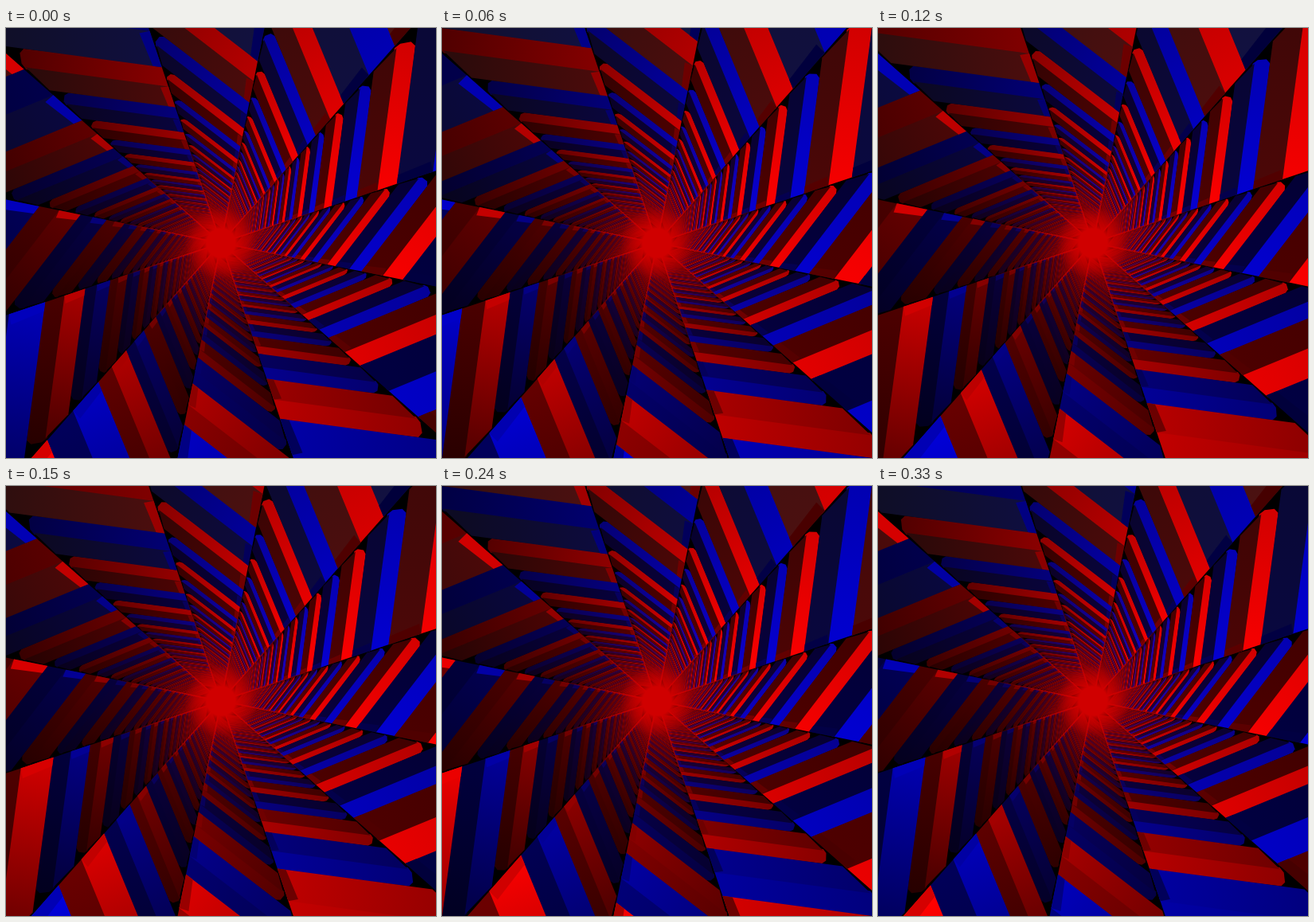
These frames come from a looping animation (540x540 px, 0.36 s). An HTML page with a canvas:

```html
<!DOCTYPE html>
<html>
<head>
<meta charset="utf-8">
<style>
  html, body { margin: 0; width: 100%; height: 100%; overflow: hidden; background: #000; }
  canvas { display: block; width: 540px; height: 540px; }
</style>
</head>
<body>
<canvas id="stage" width="540" height="540"></canvas>
<script>
const ctx = document.getElementById('stage').getContext('2d');
const STEP = 30, LOOP = 360, CENTER = 270;
const WALLS = 12, BARS = 44, TURN = 360 / WALLS, TILT = 11.55;
// Each wall is tilted: one edge lies closer to the axis than the other.
const NEAR_EDGE = 792, FAR_EDGE = 1268;
const FOG = [208, 0, 0];

const clamp = v => Math.max(0, Math.min(1, v));
const mix = (a, b, k) => a + (b - a) * k;

// How directly a wall faces a light that shines best on wall number `best`.
const facing = (wall, best) => Math.cos((wall - best) * TURN * Math.PI / 180);

// Brightness of each face, near the viewer and deep inside the tunnel.
const light = {
  front: {
    near: wall => 160 + 90 * facing(wall, 1.8),
    deep: wall => 155 + 100 * facing(wall, 0.9)
  },
  inner: {
    near: wall => 75 + 180 * clamp((facing(wall, 5.6) - 0.2) * 1.7),
    deep: () => 72
  },
  cap: {
    near: wall => Math.max(70, 135 + 110 * facing(wall, 7.5)),
    deep: () => 110
  }
};

function polar(angle, radius) {
  const a = angle * Math.PI / 180;
  return [CENTER + radius * Math.sin(a), CENTER - radius * Math.cos(a)];
}

// Point on a wall at depth z; u runs from the inner edge (0) to the outer edge (1).
function wallPoint(wall, z, u) {
  const start = TILT + wall * TURN;
  const p = polar(start + TURN - 0.15, NEAR_EDGE / z);
  const q = polar(start + 0.15, FAR_EDGE / z);
  return [mix(p[0], q[0], u), mix(p[1], q[1], u)];
}

function shade(face, wall, z, red, dim) {
  const nearness = clamp((6 - z) / 3.4);
  const level = mix(light[face].deep(wall), light[face].near(wall), nearness) * dim;
  const gray = face === 'inner' ? 20 * nearness * clamp(facing(wall, 11)) : 0;
  const rgb = red ? [level, gray, gray] : [gray, gray, level * 0.85];
  const fog = 1 - Math.exp(-Math.pow(z / 22, 2.6));
  return 'rgb(' + rgb.map((c, i) => Math.round(mix(c, FOG[i], fog))).join(',') + ')';
}

function fillFace(face, wall, z, red, corners) {
  const paint = ctx.createLinearGradient(...wallPoint(wall, z, 0), ...wallPoint(wall, z, 1));
  const fade = face === 'cap' ? 1 : 0.67 + 0.2 * facing(wall, 2);
  paint.addColorStop(0, shade(face, wall, z, red, 1));
  paint.addColorStop(1, shade(face, wall, z, red, fade));
  ctx.fillStyle = paint;
  ctx.beginPath();
  corners.forEach(([depth, u]) => ctx.lineTo(...wallPoint(wall, depth, u)));
  ctx.fill();
}

function drawBar(wall, z, red) {
  const edge = z + 0.42, end = z + 1;
  fillFace('front', wall, z + 0.2, red, [
    [z - 0.03, 0], [z - 0.03, 0.3], [z, 0.85], [z + 0.1, 0.91],
    [z + 0.34, 0.985], [edge + 0.05, 1], [edge + 0.05, 0]
  ]);
  fillFace('inner', wall, z + 0.7, red, [[edge, 0], [edge, 0.985], [end, 1], [end, 0]]);
  fillFace('cap', wall, z + 0.7, red, [[edge, 0], [edge + 0.05, 0.06], [end, 0.055], [end, 0]]);
}

function drawEdges() {
  const glow = ctx.createRadialGradient(CENTER, CENTER, 20, CENTER, CENTER, 140);
  glow.addColorStop(0, 'rgba(208,0,0,1)');
  glow.addColorStop(0.5, 'rgba(208,0,0,0.55)');
  glow.addColorStop(1, 'rgba(208,0,0,0)');
  ctx.strokeStyle = glow;
  ctx.lineWidth = 1.4;
  ctx.beginPath();
  for (let wall = 0; wall < WALLS; wall++) {
    ctx.moveTo(CENTER, CENTER);
    ctx.lineTo(...polar(TILT + wall * TURN, 140));
  }
  ctx.stroke();
}

function drawCore() {
  const core = ctx.createRadialGradient(CENTER, CENTER, 18, CENTER, CENTER, 46);
  core.addColorStop(0, 'rgba(208,0,0,1)');
  core.addColorStop(1, 'rgba(208,0,0,0)');
  ctx.fillStyle = core;
  ctx.fillRect(CENTER - 46, CENTER - 46, 92, 92);
}

function draw(time) {
  const travel = time / (LOOP / 2);
  ctx.fillStyle = '#000';
  ctx.fillRect(0, 0, 540, 540);
  for (let n = BARS; n > 0; n--) {
    const z = n + 0.4 - travel;
    if (z < 0.6) continue;
    for (let wall = 0; wall < WALLS; wall++) drawBar(wall, z, n % 2 === 1);
  }
  drawEdges();
  drawCore();
}

const started = performance.now();
let shown = -1;
function tick() {
  const elapsed = Math.max(0, performance.now() - started) % LOOP;
  const step = Math.floor(elapsed / STEP);
  if (step !== shown) {
    shown = step;
    draw(step * STEP);
  }
  requestAnimationFrame(tick);
}
tick();
</script>
</body>
</html>
```
